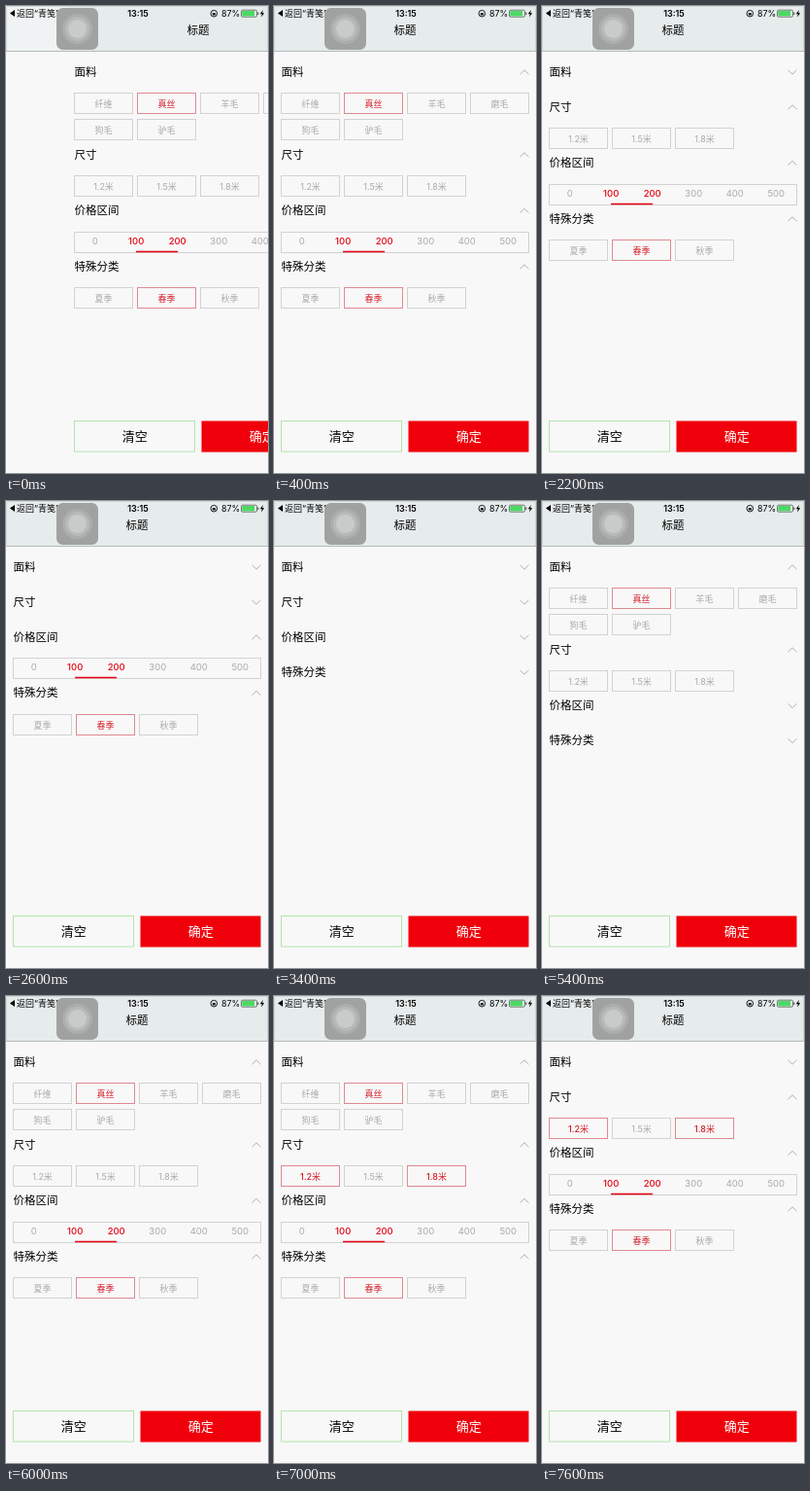
An HTML page for the animation above (8000 ms loop, 270 by 480 pixels).

```html
<!DOCTYPE html>
<html lang="zh-CN">
<head>
<meta charset="utf-8">
<style>
html, body { margin: 0; width: 100%; height: 100%; overflow: hidden; background: #f8f8f8; }
svg { display: block; width: 270px; height: 480px; font-family: Inter, "Noto Sans CJK SC", "Noto Sans CJK", sans-serif; }
</style>
</head>
<body>
<svg viewBox="0 0 270 480">
  <rect width="270" height="46" fill="#f0f3f3"/>
  <rect id="bar" width="270" height="46" fill="#e6ecec"/>
  <path d="M0 46.5H270" stroke="#b5baba"/>
  <path d="M.5 46V.5H269.5V46" fill="none" stroke="#d2d7d7"/>
  <g id="page"></g>
  <g id="status"></g>
  <rect x="52" y="2" width="43" height="43" rx="6.5" fill="#a0a1a1"/>
  <g transform="translate(73.5 23.5)">
    <circle r="15.5" fill="#acadad"/><circle r="12.5" fill="#b8b9b9"/><circle r="9.5" fill="#c9caca"/>
  </g>
</svg>
<script>
const LOOP = 8000, GREY = '#aaa', RED = '#d41c28', LINE = '#d2d2d2';
const $ = id => document.getElementById(id);

const sections = [
  { name: '面料', height: 85, chips: ['纤维', '真丝', '羊毛', '磨毛', '狗毛', '驴毛'] },
  { name: '尺寸', height: 57.5, chips: ['1.2米', '1.5米', '1.8米'] },
  { name: '价格区间', height: 57.5, prices: [0, 100, 200, 300, 400, 500] },
  { name: '特殊分类', height: 57.5, chips: ['夏季', '春季', '秋季'] }
];

// time, then one digit per section: 1 = unfolded
const folds = [[0, '1111'], [2200, '0111'], [2600, '0011'], [3000, '0001'], [3400, '0000'],
  [4200, '1000'], [5400, '1100'], [5800, '1110'], [6000, '1111'], [7400, '0111']];
const pickedAt = { 真丝: 0, 春季: 0, '1.8米': 6400, '1.2米': 6800, 狗毛: 7200 };

function text(s, x, y, size, fill = '#000', weight = 400, anchor = 'middle') {
  return `<text x="${x}" y="${y + size * .37}" font-size="${size}" fill="${fill}" font-weight="${weight}" text-anchor="${anchor}">${s}</text>`;
}

function box(x, y, w, h, stroke) {
  return `<rect x="${x}" y="${y}" width="${w}" height="${h}" fill="none" stroke="${stroke}"/>`;
}

function chip(label, i, top, t) {
  const x = 7.5 + i % 4 * 65, y = top + (i > 3 ? 27 : 0), on = t >= pickedAt[label];
  return box(x, y, 60, 21, on ? '#de8a90' : LINE) +
    text(label, x + 30, y + 11, 9, on ? RED : GREY, on ? 500 : 400);
}

function priceRow(prices, top) {
  return box(7.5, top, 255, 21, LINE) +
    prices.map((p, i) => {
      const on = i === 1 || i === 2;
      return text(p, 28.7 + i * 42.5, top + 9.3, 9.5, on ? '#e60012' : GREY, on ? 500 : 400);
    }).join('') +
    `<path d="M71 ${top + 20}h43" stroke="#e60012" stroke-width="1.6"/>`;
}

function page(t, open) {
  let y = 68, out = text('标题', 135, 25, 11.5);
  sections.forEach((s, i) => {
    const up = open[i] === '1', d = up ? -2.2 : 2.2, top = Math.round(y) + 21.5;
    out += text(s.name, 7.5, Math.floor(y), 11.5, '#000', 400, 'start') +
      `<path d="M253.5 ${y - d}l4.5 ${2 * d}l4.5 ${-2 * d}" fill="none" stroke="#aaa" stroke-width=".9"/>`;
    if (up) out += s.prices ? priceRow(s.prices, top) : s.chips.map((c, k) => chip(c, k, top, t)).join('');
    y += up ? s.height : 36;
  });
  return out + box(7.5, 426.5, 124, 31.5, '#b4e3ad') + text('清空', 69.7, 442.5, 13) +
    '<rect x="138.5" y="426.5" width="124" height="32" fill="#f0000a"/>' + text('确定', 200.7, 442.5, 13, '#fff');
}

$('status').innerHTML =
  '<path d="M4 7.5l5-3.5v7z"/>' + text('返回“青笺”', 11, 7.5, 9, '#000', 400, 'start') +
  text('13:15', 136, 7.5, 9, '#000', 600) +
  '<circle cx="214.3" cy="7.7" r="3.3" fill="none" stroke="#000" stroke-width=".9"/><path d="M212.8 7.2h3v2.2h-3z"/>' +
  text('87%', 231.5, 7.5, 8.8) +
  '<rect x="242.5" y="4.2" width="16" height="7" rx="1.3" fill="none" stroke="#444" stroke-width=".7"/>' +
  '<rect x="243.3" y="5" width="12.8" height="5.4" fill="#4cd964"/><path d="M259.3 6.5h1v2.4h-1z" fill="#444"/>' +
  '<path d="M264.8 4l-3 4.2h2l-.8 3.3l3.2-4.3h-2z"/>';

let shown = '';
function frame(now) {
  const t = now % LOOP, shift = t < 200 ? 63 : 0;
  const open = folds.filter(f => f[0] <= t).pop()[1];
  const html = page(t, open), key = shift + html;
  if (key !== shown) {
    shown = key;
    $('page').innerHTML = html;
    $('page').setAttribute('transform', `translate(${shift} 0)`);
    $('bar').setAttribute('x', shift);
  }
  requestAnimationFrame(frame);
}
frame(0);
</script>
</body>
</html>
```
